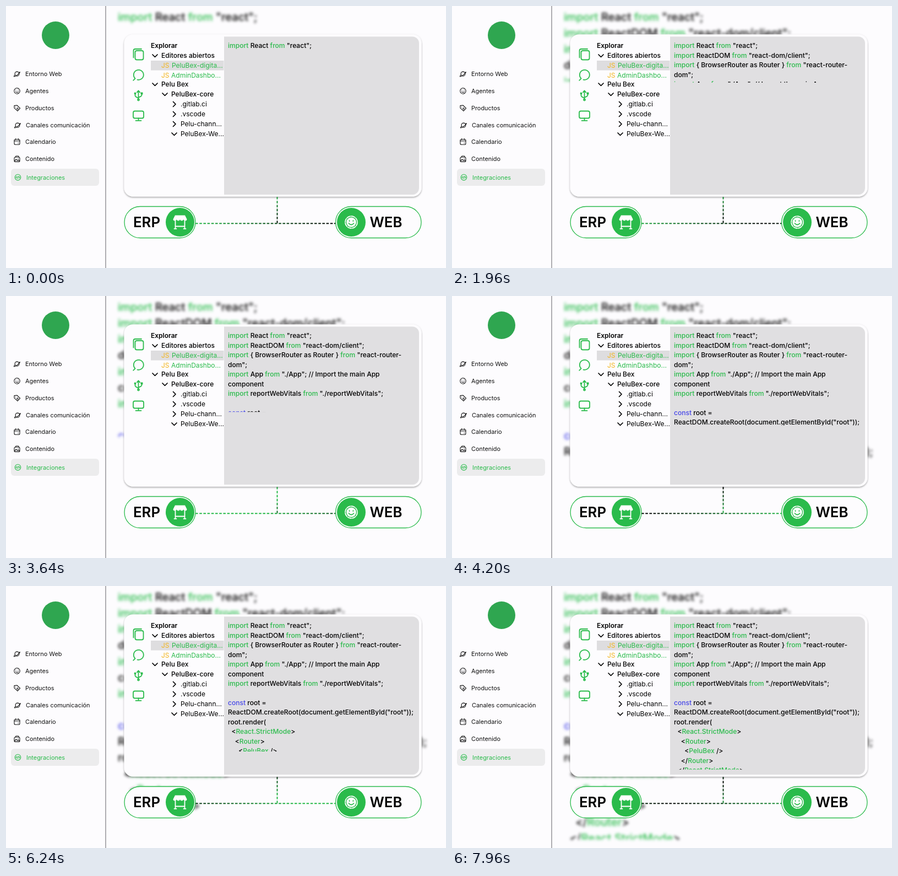
Write an HTML page that moves like this. It is 799 px wide and 475 px high and loops after 8 s.

```html
<!DOCTYPE html>
<html lang="es">
<head>
<meta charset="utf-8">
<title>Integraciones</title>
<style>
html, body { margin: 0; width: 100%; height: 100%; overflow: hidden; background: #fdfcfe; }
svg { display: block; width: 799px; height: 475px; font-family: Inter, "Open Sans", sans-serif; }
.line { fill: none; stroke: #111; stroke-width: 1.1; stroke-linecap: round; stroke-linejoin: round; }
.green { stroke: #2abb4b; }
.tool { stroke-width: 1.8; }
.chevron { stroke: #000; stroke-width: 1.7; }
.white { stroke: #fff; stroke-width: 1.8; }
.big { font-size: 25.8px; font-weight: 600; }
.code { font-size: 12.05px; font-weight: 500; white-space: pre; }
</style>
</head>
<body>
<svg viewBox="0 0 799 475">
  <defs>
    <clipPath id="frontClip"><rect id="frontWindow" x="-10" y="-20" width="400" height="22"/></clipPath>
    <clipPath id="backClip"><rect id="backWindow" x="-10" y="-20" width="400" height="25"/></clipPath>
    <filter id="blur" x="-5%" y="-15%" width="110%" height="130%"><feGaussianBlur stdDeviation="1.7"/></filter>
    <filter id="shadow" x="-5%" y="-5%" width="110%" height="112%">
      <feDropShadow dx="0" dy="1.5" stdDeviation="1.8" flood-color="#000" flood-opacity=".38"/>
    </filter>
    <linearGradient id="flowX" gradientUnits="userSpaceOnUse" x1="344" y1="0" x2="1614" y2="0" spreadMethod="repeat">
      <stop offset="0" stop-color="#2abb4b"/><stop offset=".2" stop-color="#080c09"/>
      <stop offset=".4" stop-color="#2abb4b"/><stop offset="1" stop-color="#2abb4b"/>
    </linearGradient>
    <linearGradient id="flowY" href="#flowX" x1="0" y1="346" x2="0" y2="586"/>
    <g id="planet" class="line">
      <circle r="3.9"/><path d="M-3.5 1.8C-8 6-4.5 5.8 0 2.4S7.6-5.2 3.4-2.4"/>
    </g>
    <g id="code" class="code"></g>
  </defs>

  <rect width="799" height="475" fill="#fdfcfe"/>
  <g transform="translate(203 27.1) scale(1.667)" filter="url(#blur)">
    <g clip-path="url(#backClip)"><use href="#code"/></g>
  </g>

  <!-- sidebar -->
  <path d="M181 0V475" stroke="#858387" stroke-width="1.3"/>
  <circle cx="90" cy="53" r="25" fill="#2fa650"/>
  <rect x="9" y="295" width="160" height="31" rx="6" fill="#ececed"/>
  <g id="menu"></g>
  <use href="#planet" x="20" y="123"/>
  <use href="#planet" x="21" y="216"/>
  <g class="line">
    <circle cx="20" cy="154" r="5.2" stroke-dasharray="3.1 1"/>
    <path d="M18 152.4v.4M22 152.4v.4M17.6 155.4q2.4 2.6 4.8 0"/>
    <path d="M15 180.6l5-.6 5.6 5.4-4.6 5-6-5.6zM17.6 183v.2M19.4 186.4l2.2-2M20.8 187.6l1.6-1.4"/>
    <rect x="15" y="241.8" width="10" height="9.4" rx="2"/><path d="M15 244.8h10M17.6 240.6v2M22.4 240.6v2M22 248.4h.4"/>
    <path d="M17 274l1-2h4.5l1 2"/><rect x="15" y="274" width="10" height="8.4" rx="2"/>
    <path d="M15.4 281l3-3 2.4 2.2 1.6-1.2 2.2 2M22 276.6h.3"/>
    <g class="green">
      <circle cx="21.5" cy="310.6" r="5.3"/><path d="M19.6 309l-1.6 1.6 1.6 1.6M23.4 309l1.6 1.6-1.6 1.6M22 308.6l-1 4"/>
    </g>
  </g>

  <!-- connectors -->
  <g fill="none" stroke-width="2" stroke-dasharray="4.6 2.6">
    <path d="M492.5 346V394" stroke="url(#flowY)"/>
    <path d="M344 394.3H598" stroke="url(#flowX)"/>
  </g>

  <!-- editor -->
  <rect x="214.5" y="51.5" width="540" height="294" rx="16" fill="#fdfcfe" filter="url(#shadow)"/>
  <path d="M396 55.5H738a12 12 0 0 1 12 12V330a12 12 0 0 1-12 12H396z" fill="#e0dfe1"/>
  <rect x="263" y="99" width="132.5" height="17.6" fill="#dedddf"/>
  <g class="line green tool">
    <rect x="234.5" y="81" width="15" height="16.5" rx="3"/><path d="M231.5 93.5V81a3 3 0 0 1 3-3H246"/>
    <path d="M234.6 131.4a9 9 0 1 1 4 2.2M234.6 131.4l-3.4 3.4"/>
    <path d="M240.5 154v15M237.8 156.6l2.7-3.2 2.7 3.2M234.5 159.5v3q0 2 6 4.5M246.5 158.5v3q0 2-6 4.5"/>
    <circle cx="234.5" cy="158.5" r="1"/><circle cx="240.5" cy="170" r="1.5"/><path d="M245.4 157.5h2.2v2h-2.2z"/>
    <rect x="231" y="190.5" width="19" height="13" rx="3"/><path d="M240.5 203.5v4M235.5 207.8h10"/>
  </g>
  <g id="tree"></g>
  <g transform="translate(403 76.3)"><g clip-path="url(#frontClip)"><use href="#code"/></g></g>

  <!-- endpoints -->
  <g fill="#fdfcfe" stroke="#2abb4b" stroke-width="1.3">
    <rect x="215" y="363.5" width="129" height="57" rx="28.5"/>
    <rect x="598.5" y="363.5" width="155.5" height="57" rx="28.5"/>
  </g>
  <g fill="#2abb4b"><circle cx="316" cy="392" r="26"/><circle cx="627" cy="392" r="26"/></g>
  <text class="big" x="231" y="401.4">ERP</text>
  <text class="big" x="660.5" y="401.4">WEB</text>
  <path d="M307 379.5h18l3.5 7a3.2 3.2 0 0 1-6.3.6 3.2 3.2 0 0 1-6.2 0 3.2 3.2 0 0 1-6.2 0 3.2 3.2 0 0 1-6.3-.6z" fill="#fff"/>
  <path class="line white" d="M307.5 390v13.5M324.5 390v13.500M307.5 399.500h17M305.500 403.800h4M322.500 403.800h4"/>
  <circle class="line white" cx="627" cy="392" r="11" stroke-dasharray="6.600 2.040"/>
  <circle cx="627" cy="392" r="8.800" fill="#fff"/>
  <path class="line green tool" d="M623.600 389.200v.8M630.400 389.200v.8M622.500 394q4.500 5 9 0"/>
</svg>
<script>
const NS = "http://www.w3.org/2000/svg";
const GREEN = "#2abb4b", BLUE = "#4646e8", AMBER = "#f3b51c";
const LOOP = 8000, FLOW = 1915, LINE = 17.46, BASELINE = 76.3;
const byId = id => document.getElementById(id);

function add(parent, tag, attrs, content = "") {
  const node = document.createElementNS(NS, tag);
  for (const key in attrs) node.setAttribute(key, attrs[key]);
  node.textContent = content;
  return parent.appendChild(node);
}

[["Entorno Web", 35, 123], ["Agentes", 35, 154], ["Productos", 35, 185],
 ["Canales comunicación", 36, 216], ["Calendario", 35, 246], ["Contenido", 35, 277.5],
 ["Integraciones", 37, 311]].forEach(([label, x, y], i) =>
  add(byId("menu"), "text", { x, y: y + 3.9, "font-size": 10.9, fill: i === 6 ? GREEN : "#111" }, label));

// label, x, y, weight, marker
const tree = [
  ["Explorar", 263, 72, 600],
  ["Editores abiertos", 282, 90, 500, "open"],
  ["PeluBex-digita...", 301, 108, 400, "js"],
  ["AdminDashbo...", 300, 126, 400, "js"],
  ["Pelu Bex", 282, 142, 500, "open"],
  ["PeluBex-core", 300, 160, 500, "open"],
  [".gitlab.ci", 317, 178, 400, "closed"],
  [".vscode", 317, 196, 400, "closed"],
  ["Pelu-chann...", 317, 214, 400, "closed"],
  ["PeluBex-We...", 317, 232, 400, "open"]
];
for (const [label, x, y, weight, marker] of tree) {
  const style = { y: y + 4.2, "font-size": 12, "font-weight": weight };
  add(byId("tree"), "text", { ...style, x, fill: marker === "js" ? GREEN : "#000" }, label);
  if (marker === "js") add(byId("tree"), "text", { ...style, x: 282, fill: AMBER }, "JS");
  else if (marker) add(byId("tree"), "path", {
    class: "line chevron",
    d: marker === "open" ? `M${x - 16} ${y - 2}l4.5 4.5 4.5-4.5` : `M${x - 13.5} ${y - 4.5}l4.5 4.5-4.5 4.5`
  });
}

// ~ toggles green, ^ toggles blue
const code = [
  '~import~ React ~from~ "react";',
  '~import~ ReactDOM ~from~ "react-dom/client";',
  '~import~ { BrowserRouter as Router } ~from~ "react-router-',
  'dom";',
  '~import~ App ~from~ "./App"; // Import the main App',
  'component',
  '~import~ reportWebVitals ~from~ "./reportWebVitals";',
  '',
  '^const^ root =',
  'ReactDOM.createRoot(document.getElementById("root"));',
  'root.render(',
  '  <~React.StrictMode~>',
  '    <~Router~>',
  '      <~PeluBex~ />',
  '    </~Router~>',
  '  </~React.StrictMode~>'
];
code.forEach((source, i) => {
  const indent = source.search(/\S|$/);
  const row = add(byId("code"), "text", { x: indent * 3.2, y: i * LINE });
  let color = "#000";
  for (const part of source.trim().split(/([~^])/)) {
    if (part === "~") color = color === GREEN ? "#000" : GREEN;
    else if (part === "^") color = color === BLUE ? "#000" : BLUE;
    else if (part) add(row, "tspan", { fill: color }, part);
  }
});

// time and lower edge of the revealed code
const edges = [[0, 78], [980, 105], [1960, 139], [3040, 184], [4200, 234.5],
               [5040, 264.5], [6240, 300], [7100, 319], [LOOP, 333.5]];

function edgeAt(t) {
  const i = edges.findIndex(([time]) => time > t);
  const [t0, y0] = edges[i - 1], [t1, y1] = edges[i];
  return y0 + (y1 - y0) * (t - t0) / (t1 - t0);
}

function draw(now) {
  const t = now % LOOP, shift = -t / FLOW;
  const height = edgeAt(t) - BASELINE + 20;
  byId("frontWindow").setAttribute("height", height);
  byId("backWindow").setAttribute("height", height + 3);
  byId("flowX").setAttribute("gradientTransform", `translate(${shift * 1270} 0)`);
  byId("flowY").setAttribute("gradientTransform", `translate(0 ${shift * 240})`);
  requestAnimationFrame(draw);
}
draw(performance.now());
</script>
</body>
</html>
```
